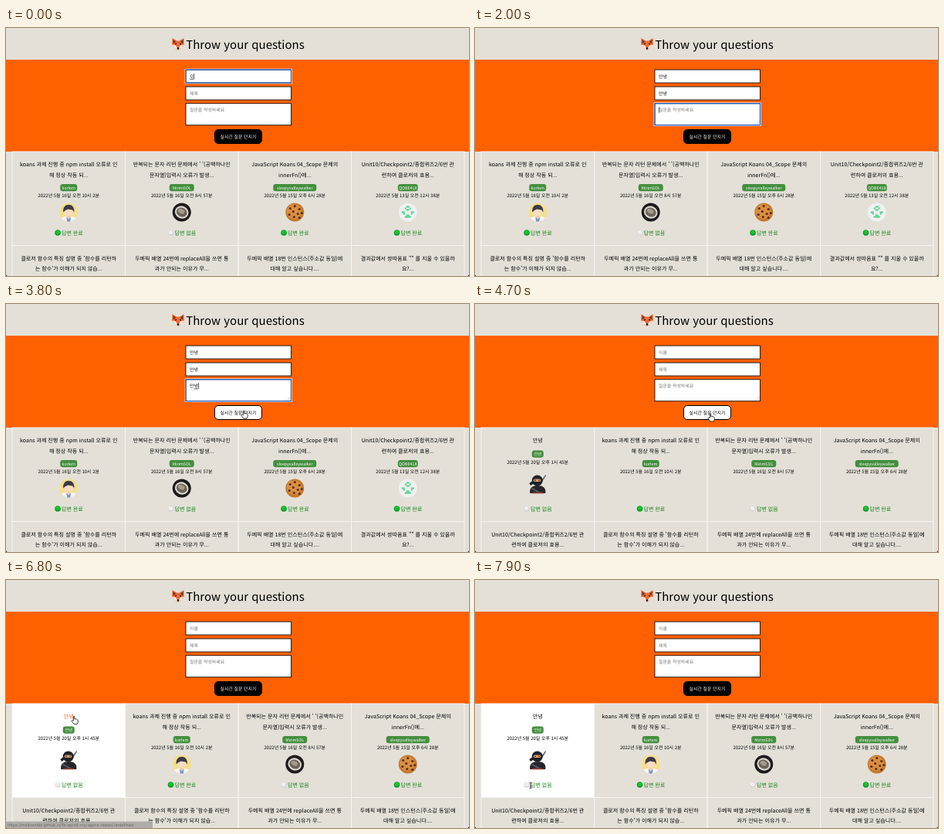
Animation of 600x321 px, one loop 8 s. Source, as an HTML page:

```html
<!DOCTYPE html>
<html lang="ko">
<head>
<meta charset="utf-8">
<title>Throw your questions</title>
<style>
html, body { margin: 0; width: 100%; height: 100%; overflow: hidden; background: #e4e0d8; }
svg { display: block; width: 100%; height: 100%; }
text {
  font-family: "Noto Sans CJK KR", "Noto Sans KR", "Noto Sans CJK JP", sans-serif;
  font-weight: 500; text-rendering: geometricPrecision; white-space: pre;
}
</style>
</head>
<body>
<svg id="stage" viewBox="0 0 600 321"></svg>
<script>
const LOOP = 8000, COL = 146.5, LEFT = 8, TOP = 160, ROW = 121.5;
const POSTED = 4600, LOADED = 4900;

const text = (x, y, s, size, fill = '#000', anchor = 'middle', extra = '') =>
  `<text x="${x}" y="${y}" font-size="${size}" fill="${fill}" text-anchor="${anchor}" ${extra}>${s}</text>`;
const rect = (x, y, w, h, fill, extra = '') =>
  `<rect x="${x}" y="${y}" width="${w}" height="${h}" fill="${fill}" ${extra}/>`;
const circle = (x, y, r, fill, extra = '') =>
  `<circle cx="${x}" cy="${y}" r="${r}" fill="${fill}" ${extra}/>`;
const path = (d, fill, extra = '') => `<path d="${d}" fill="${fill}" ${extra}/>`;
const at = (x, y, s) => `<g transform="translate(${x} ${y})">${s}</g>`;

// Avatars are drawn around their own centre
const avatars = {
  student: circle(0, 0, 12, '#f3e08a')
    + path('M-9.5 7.3C-7 4.5 7 4.5 9.5 7.3A12 12 0 0 1-9.5 7.3', '#f4f5f8')
    + path('M-2 3h4v4l-2 2-2-2z', '#efc8a8')
    + circle(0, -1, 6, '#f8dcc4')
    + path('M-7 0C-9-13 9-13 7 0L5-3-1-4-5-2z', '#3c3a48')
    + path('M-3 6L0 9 3 6 2 12H-2z', '#7d93c4'),
  bowl: circle(0, 0, 12, '#1c1a1a')
    + `<g transform="rotate(25)"><ellipse rx="9" ry="8" fill="#d8d5cd"/><ellipse rx="7" ry="5.8" fill="#6d6459"/>`
    + `<ellipse cx="-1" cy="-1" rx="4.5" ry="3" fill="#a39a8a"/></g>`,
  cookie: circle(0, 0, 12, '#c47a30') + circle(-1, -1, 9.5, '#d98f42')
    + [[-6, -5], [0, -8], [6, -4], [-2, -1], [4, 2], [-7, 3], [-1, 6], [6, 7], [9, 1]]
      .map(([x, y]) => circle(x, y, 1.6, '#5e2d15')).join(''),
  blocks: circle(0, 0, 12, '#f0f0f0')
    + [[-2, -8, 4, 2], [-4, -6, 2, 2], [2, -6, 2, 2], [-2, -4, 4, 2], [-8, -1, 4, 2], [4, -1, 4, 2],
       [-6, 1, 2, 2], [4, 1, 2, 2], [-2, 3, 4, 2], [-4, 5, 8, 2]]
      .map(b => rect(...b, '#49d38a')).join(''),
  ninja: path('M4-4L10-12 11-11 6-3z', '#6b6b70')
    + path('M-10 12C-11 5-7 2 0 2S11 5 10 12z', '#24262b')
    + path('M-5-5L-11-1-9 2-5-1z', '#1b1c20')
    + circle(-.5, -4.5, 7, '#202227')
    + rect(-5.5, -6.5, 9.5, 3.4, '#dca06c', 'rx="1.6"')
    + rect(-4, -5.4, 1.6, 1.3, '#222') + rect(1, -5.4, 1.6, 1.3, '#222')
    + path('M-8 4L6 12H2L-9 6z', '#51545c') + rect(-7, 10.5, 14, 1.8, '#8f3a2e'),
};

const post = (lines, user, pill, date, avatar, done) => ({ lines, user, pill, date, avatar, done });
const older = [
  post(['koans 과제 진행 중 npm install 오류로 인', '해 정상 작동 되...'], 'korlem', 22, '2022년 5월 16일 오전 10시 2분', 'student', true),
  post(["반복되는 문자 리턴 문제에서 ' '(공백하나인", '문자열)입력시 오류가 발생...'], 'MirimSOL', 32, '2022년 5월 16일 오전 8시 57분', 'bowl', false),
  post(['JavaScript Koans 04_Scope 문제의', 'innerFn()에...'], 'sleepyvalleywalker', 56, '2022년 5월 15일 오후 6시 28분', 'cookie', true),
  post(['Unit10/Checkpoint2/종합퀴즈2/6번 관', '련하여 클로저의 효용...'], 'QOBE418', 26, '2022년 5월 13일 오전 12시 38분', 'blocks', true),
  { lines: ["클로저 함수의 특징 설명 중 '함수를 리턴하", "는 함수'가 이해가 되지 않습..."] },
  { lines: ['두메픽 배열 24번에 replaceAll을 쓰면 통', '과가 안되는 이유가 무...'] },
  { lines: ['두메픽 배열 18번 인스턴스(주소값 동일)에', '대해 알고 싶습니다....'] },
  { lines: ['결과값에서 쌍따옴표 "" 를 지울 수 있을까', '요?...'] },
];
const fresh = post(['안녕'], '안녕', 15, '2022년 5월 20일 오후 1시 45분', 'ninja', false);

function card(p, i, t, hot, link) {
  const x = LEFT + i % 4 * COL, y = TOP + (i > 3 ? ROW : 0), c = x + COL / 2;
  let s = rect(x, y, COL, ROW, hot ? '#fff' : 'none', 'stroke="#f8f6f2" stroke-width=".9"');
  p.lines.forEach((l, k) => s += text(c, y + 19.3 + k * 13.3, l, 7.04, link ? '#e8641b' : '#000'));
  if (!p.user) return s;
  const up = p.lines.length < 2 ? 12.6 : 0;
  s += rect(c - p.pill / 2, y + 42.1 - up, p.pill, 9.2, '#438f3e', 'rx="3.2"')
    + text(c, y + 48.7 - up, p.user, 5.28, '#fff')
    + text(c, y + 59.3 - up, p.date, 5.95);
  const loading = p !== fresh && t >= POSTED && t < LOADED;
  if (!loading) s += at(c, y + (up ? 73 : 78.5), avatars[p.avatar]);
  s += p.done
    ? circle(c - 14.2, y + 105, 3.8, '#0b9c22') + circle(c - 14.2, y + 104.2, 2.6, '#18c233')
    : circle(c - 14.2, y + 105, 3.6, '#d2d2d2') + circle(c - 14.4, y + 104.5, 2.8, '#efefef');
  return s + text(c - 9.3, y + 107.6, '답변 ' + (p.done ? '완료' : '없음'), 7.04, '#178217', 'start');
}

// Successive states of the Korean input method
const jamo = ['', 'ㅇ', '아', '안', '안ㄴ', '안녀', '안녕'];
const typed = (t, start) => jamo[Math.max(0, Math.min(6, Math.floor((t - start) / 100)))];

function field(y, h, hint, value, focus, caretOn) {
  const base = y + 10.7, end = 238 + value.length * 5.45;
  let s = rect(233, y, 136.5, h, '#fff', 'stroke="#111" stroke-width=".9"');
  if (focus) s += rect(232.2, y - .8, 138.1, h + 1.6, 'none', 'stroke="#fff" stroke-width="1"')
    + rect(233, y, 136.5, h, 'none', 'stroke="#1f5fc4" stroke-width="1.3"');
  s += text(238, base, value || hint, 5.92, value ? '#000' : '#757575', 'start');
  if (focus && value) s += rect(end - 5.4, base + 1.2, 5.4, .6, '#000');
  if (focus && caretOn) s += rect(end + .1, base - 6, .6, 7.5, '#000');
  if (h > 20) s += path(`M364 ${y + h - 1}l4.5-4.5M366.5 ${y + h - 1}l2-2`, 'none', 'stroke="#888" stroke-width=".5"');
  return s;
}

function form(t) {
  const sent = t >= POSTED, caret = Math.floor((t + 200) / 500) % 2 === 0;
  const name = t < 200 ? '으' : typed(t, 200), title = typed(t, 1100), body = typed(t, 2100);
  const hover = t >= 3550 && t < 5150;
  return rect(0, 41, 600, 119, '#ff6000')
    + field(54, 17, '이름', sent ? '' : name, t < 1000, caret)
    + field(76, 17, '제목', sent ? '' : title, t >= 1000 && t < 1900, caret)
    + field(97.7, 28, '질문을 작성하세요', sent ? '' : body, t >= 1900 && t < 4500, caret)
    + rect(270.5, 131.5, 61, 18, hover ? '#fff' : '#000', 'rx="4.5" stroke="#000"')
    + text(301, 142.7, '실시간 질문 던지기', 5.92, hover ? '#000' : '#fff');
}

const fox = at(223, 20.5,
  path('M-7.5-7.5L-2-4H2L7.5-7.5 8 1 3.5 6.5 0 8-3.5 6.5-8 1z', '#ef6a35')
  + path('M-6.5-5.5L-3-3-6 0zM6.5-5.5L3-3 6 0z', '#5b3530')
  + path('M-8 1L-3 2 0 7 3 2 8 1 4 6 0 8-4 6z', '#f6e9dd')
  + circle(-3, 0, 1, '#222') + circle(3, 0, 1, '#222') + circle(0, 6, 1.4, '#222'));

const cursors = {
  arrow: path('M0 0V8L1.9 6.3 3.2 9.2 4.5 8.6 3.3 5.8H5.8z', '#000', 'stroke="#fff" stroke-width=".6"'),
  hand: path('M-.6 0C-.6-1 .8-1 .8 0V3C2 2.5 5.3 3.2 5.3 5V7L4.3 9.5H0L-2.9 5.7C-3-4.9 4-1.5 4.4-.6 5.3z'
    .replace('C-3-4.9 4-1.5 4.4-.6 5.3', 'C-3 4.4-1.6 4.2-.6 5.3'), '#fff', 'stroke="#111" stroke-width=".8"'),
  beam: path('M-1.6-3.8Q0-3.8 0-2.8Q0-3.8 1.6-3.8M0-2.8V2.8M-1.6 3.8Q0 3.8 0 2.8Q0 3.8 1.6 3.8M-.8 1H.8', 'none', 'stroke="#111" stroke-width=".8"'),
};
const route = [[3200, 333, 117], [3600, 308, 138.5], [4200, 307.5, 139], [4600, 305, 142.5], [5000, 305, 142.5],
  [5600, 118, 167], [5800, 117.5, 168], [6400, 88, 177], [7250, 88, 177], [7700, 72, 266], [8000, 72, 266]];

function pointer(t) {
  const k = route.findIndex(p => p[0] > t);
  if (k < 1) return '';
  const [t0, x0, y0] = route[k - 1], [t1, x1, y1] = route[k];
  const u = (t - t0) / (t1 - t0), e = u * u * (3 - 2 * u);
  const shape = t < 3550 || t >= 7600 ? 'beam'
    : t < 5150 || t >= 6350 && t < 7350 ? 'hand' : 'arrow';
  return at((x0 + (x1 - x0) * e).toFixed(2), (y0 + (y1 - y0) * e).toFixed(2), cursors[shape]);
}

function statusBar(t) {
  const a = Math.max(0, Math.min(1, (t - 6500) / 150, (7600 - t) / 150));
  return a && `<g opacity="${a}">` + rect(0, 312.5, 190, 8.5, '#aaa7a2', 'opacity=".9"')
    + text(2, 318.7, 'https://mellowtide.github.io/fe-sprint-my-agora-states/undefined', 5.3, '#6c6a67', 'start',
      'style="font-family:Inter,sans-serif;font-weight:400"') + '</g>';
}

function scene(t) {
  const list = t < POSTED ? older : [fresh, ...older.slice(0, 7)];
  // The question that scrolled into the second row keeps only its heading in view
  const cards = list.map((p, i) =>
    card(i > 3 ? { lines: p.lines } : p, i, t, i === 0 && t >= 5500, i === 0 && t >= 6350 && t < 7350));
  return rect(0, 0, 600, 321, '#e4e0d8') + fox
    + text(310, 26.5, 'Throw your questions', 15, '#000', 'middle', 'style="font-weight:400"')
    + form(t) + cards.join('')
    + path('M0 318.5Q0 321 2.5 321H0zM600 318.5Q600 321 597.5 321H600z', '#111')
    + (statusBar(t) || '') + pointer(t);
}

const stage = document.getElementById('stage');
const start = performance.now();
let last = '';
function draw() {
  const next = scene((performance.now() - start) % LOOP);
  if (next !== last) stage.innerHTML = last = next;
  requestAnimationFrame(draw);
}
draw();
</script>
</body>
</html>
```
